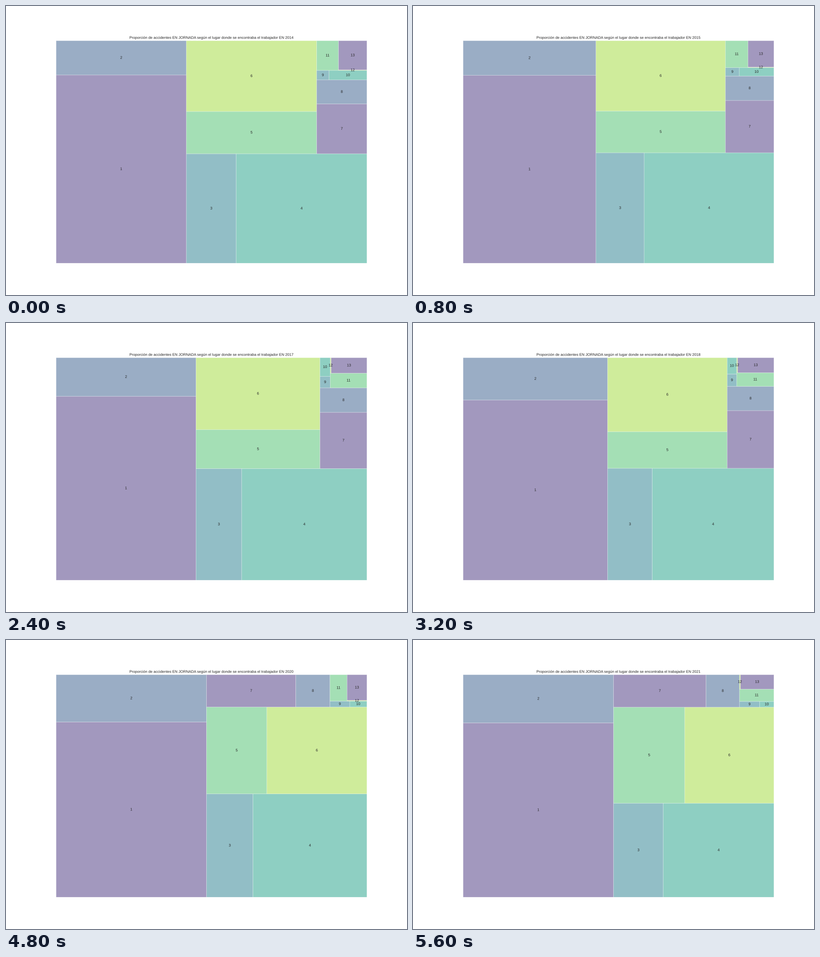
These frames come from a looping animation (881 by 636 pixels, 6.4 s). A matplotlib script:

```python
import matplotlib.pyplot as plt
import numpy as np
from matplotlib.animation import FuncAnimation
from matplotlib.patches import PathPatch, Rectangle
from matplotlib.path import Path
from matplotlib.textpath import TextPath

WIDTH, HEIGHT, DPI = 881, 636, 64
PT = WIDTH / 18 / 72  # pixels per point on an 18 inch wide sheet
EM = 12 * PT
LEFT, BOTTOM, CHART_W, CHART_H = 0.125, 0.11, 0.775, 0.77
INK = "#262626"
TITLE = ("Proporción de accidentes EN JORNADA según el lugar "
         "donde se encontraba el trabajador EN {}")
YEARS = range(2014, 2022)

# Share of each place (1/100 %) at the turning points, or at both ends only
TURNS = (2014, 2016, 2019, 2021)
SHARES = [
    (3544, 3689, 3797, 3794), (646, 690, 1001, 1048), (790, 676),
    (2069, 2083, 1910, 1504), (797, 769, 575, 988), (1334, 1238),
    (362, 373, 398, 435), (174, 157), (17, 17), (52, 12), (94, 61),
    (2, 2), (120, 82, 77, 70),
]


def share(keys, year):
    """Constant growth rate between key points."""
    years = TURNS if len(keys) == len(TURNS) else (TURNS[0], TURNS[-1])
    return np.exp(np.interp(year, years, np.log(keys)))


def worst_ratio(row, side):
    depth = sum(row) / side
    return max(max(a / depth**2, depth**2 / a) for a in row)


def squarify(areas, x, y, w, h):
    """Split a box into near-square tiles (x, y, w, h), keeping the order."""
    areas, tiles = list(areas), []
    while areas:
        side = min(w, h)
        n = 1
        while (n < len(areas) and worst_ratio(areas[:n + 1], side)
               <= worst_ratio(areas[:n], side)):
            n += 1
        row, areas = areas[:n], areas[n:]
        depth = sum(row) / side
        offset = 0
        for a in row:
            size = a / depth
            if w >= h:
                tiles.append((x, y + offset, depth, size))
            else:
                tiles.append((x + offset, y, size, depth))
            offset += size
        if w >= h:
            x, w = x + depth, w - depth
        else:
            y, h = y + depth, h - depth
    return tiles


def text_path(text, x, baseline):
    """Unhinted text outline, centred on x, in stage pixels."""
    path = TextPath((0, 0), text, size=EM)
    box = path.get_extents()
    shift = (x - (box.x0 + box.x1) / 2, baseline)
    return Path(path.vertices + shift, path.codes)


def add_layer(bounds, xmax, ymax):
    ax = fig.add_axes(bounds)
    ax.set(xlim=(0, xmax), ylim=(0, ymax))
    ax.axis("off")
    return ax


def add_text():
    return sheet.add_patch(PathPatch(Path([(0, 0)]), facecolor=INK, linewidth=0))


plt.rcParams["font.family"] = "Liberation Sans"
fig = plt.figure(figsize=(WIDTH / DPI, HEIGHT / DPI), dpi=DPI, facecolor="white")
chart = add_layer([LEFT, BOTTOM, CHART_W, CHART_H], 100, 100)
sheet = add_layer([0, 0, 1, 1], WIDTH, HEIGHT)

colors = plt.get_cmap("viridis")(np.linspace(0, 1, 8)[1:-1])
boxes = [chart.add_patch(Rectangle(
    (0, 0), 1, 1, facecolor=colors[i % len(colors)], edgecolor="white",
    linewidth=PT * 72 / DPI, alpha=0.5, snap=False))
    for i in range(len(SHARES))]
labels = [add_text() for _ in SHARES]
title = add_text()


def draw(frame):
    year = YEARS[frame]
    values = np.array([share(keys, year) for keys in SHARES])
    tiles = squarify(values * 10000 / values.sum(), 0, 0, 100, 100)
    for i, (x, y, w, h) in enumerate(tiles):
        boxes[i].set_bounds(x, y, w, h)
        cx = WIDTH * (LEFT + CHART_W * (x + w / 2) / 100)
        cy = HEIGHT * (BOTTOM + CHART_H * (y + h / 2) / 100)
        labels[i].set_path(text_path(str(i + 1), cx, cy - 0.26 * EM))
    title.set_path(text_path(TITLE.format(year), WIDTH * (LEFT + CHART_W / 2),
                             HEIGHT * (BOTTOM + CHART_H) + 6 * PT))
    return [title, *boxes, *labels]


anim = FuncAnimation(fig, draw, frames=len(YEARS), interval=800,
                     repeat=True, repeat_delay=0, blit=False)
plt.show()
```
